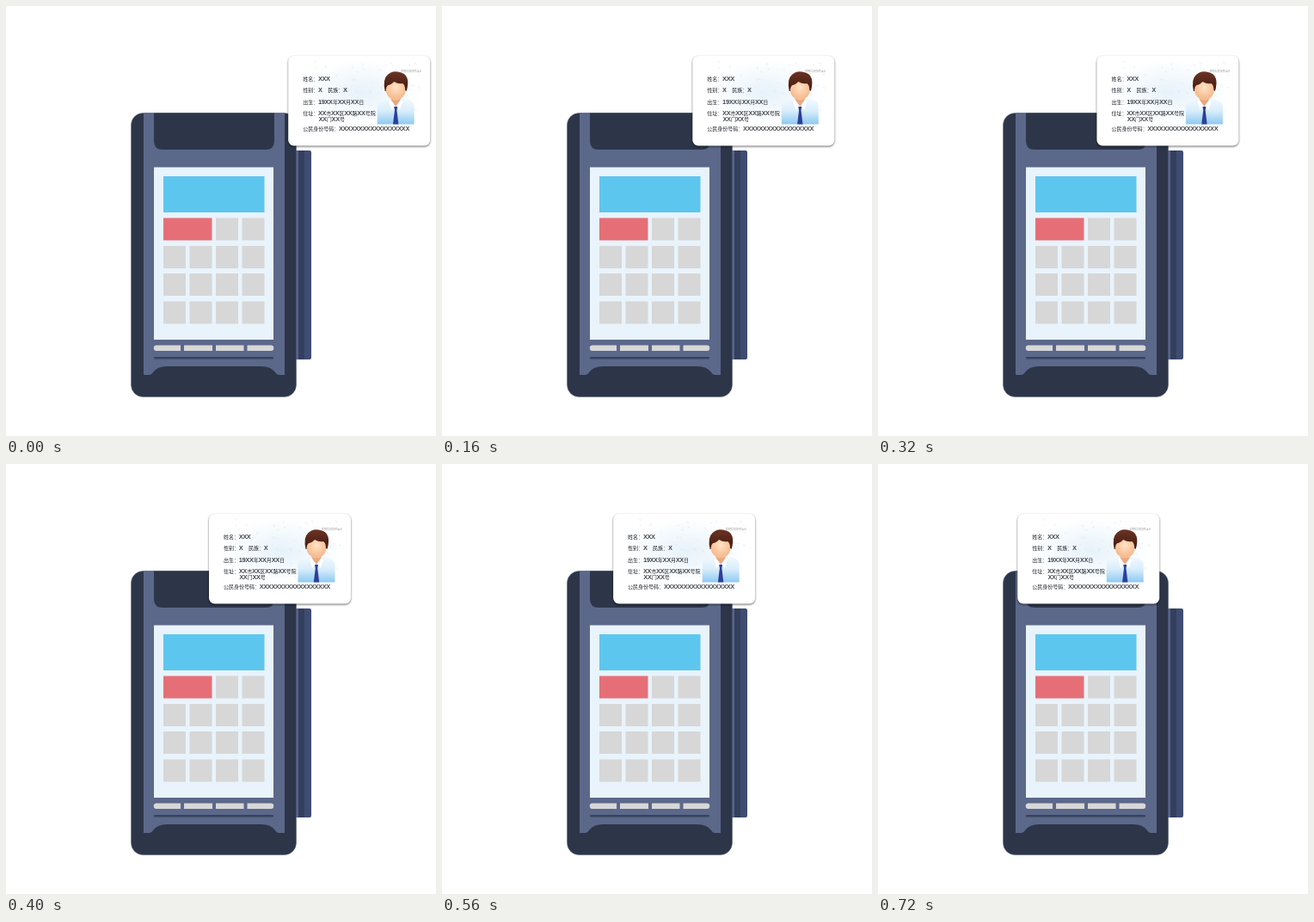
Recreate the animation shown at these times as an HTML page. Size 500 px wide and 500 px high, loop 1200 ms.

```html
<!DOCTYPE html>
<html lang="zh">
<head>
<meta charset="utf-8">
<style>
  html, body { margin: 0; width: 100%; height: 100%; overflow: hidden; background: #fff; }
  svg { display: block; width: 100%; height: 100%; }
  text { font: 500 6px "Noto Sans CJK SC", "Noto Sans CJK", sans-serif; fill: #1d1f26; }
  .latin { font: 6.84px "Liberation Sans", Arial, sans-serif; stroke: #1d1f26; stroke-width: .15; }
  .note { font-size: 3px; fill: #999; }
  #card { filter: drop-shadow(0 1px .8px rgba(0, 0, 0, .6)); }
</style>
</head>
<body>
<svg viewBox="0 0 500 500">
  <defs>
    <linearGradient id="shirt" x2="0" y2="1">
      <stop offset="0" stop-color="#f4faff"/>
      <stop offset=".5" stop-color="#d8edfb"/>
      <stop offset="1" stop-color="#8ec9f0"/>
    </linearGradient>
    <radialGradient id="skin" cy=".4">
      <stop offset="0" stop-color="#ffe3c6"/>
      <stop offset="1" stop-color="#f6bd92"/>
    </radialGradient>
    <linearGradient id="hair" x2="0" y2="1">
      <stop offset="0" stop-color="#6b3425"/>
      <stop offset="1" stop-color="#42190f"/>
    </linearGradient>
    <radialGradient id="tint">
      <stop offset="0" stop-color="#e6f2fa"/>
      <stop offset="1" stop-color="#fff"/>
    </radialGradient>
  </defs>

  <!-- card reader -->
  <rect x="332" y="168" width="23" height="243" rx="2" fill="#3f4c72"/>
  <path d="M337 168h3v243h-3z" fill="#56648a"/>
  <path d="M340 168h7v243h-7z" fill="#343f5d"/>
  <rect x="145.5" y="124.5" width="192" height="330" rx="14" fill="#2d3549" stroke="#59627a" stroke-width=".5"/>
  <path d="M160 124.5H324V429H160z" fill="#5c688a"/>
  <path d="M172 124.5H312V157q0 10-10 10H182q-10 0-10-10z" fill="#2d3549"/>
  <path d="M160 429h7q2 0 4-3q5-7 16-7H297q11 0 16 7q2 3 4 3h7v2H160z" fill="#2d3549"/>
  <path d="M172 187.5H311V388H172z" fill="#e9f3fb"/>
  <path d="M183 198H300.5V240H183z" fill="#5dc6ef"/>
  <path d="M183 246.5H239.5V272.5H183z" fill="#e66f77"/>
  <g id="keys" fill="#d7d7d8"></g>
  <path d="M203 394.5H175a3.2 3.2 0 0 0 0 6.5H203zM207 394.5H240V401H207zM244 394.5H276.5V401H244zM280.5 394.5H308a3.2 3.2 0 0 1 0 6.5H280.5z" fill="#d7d7d8"/>
  <rect x="172" y="408" width="139" height="2.5" rx="1" fill="#38425e"/>

  <!-- identity card, drawn from its own left edge -->
  <g id="card">
    <rect y="58" width="165" height="104.5" rx="6.5" fill="#fff"/>
    <ellipse cx="85" cy="101" rx="70" ry="38" fill="url(#tint)"/>
    <g id="specks" fill="none" stroke="#dcebf5" stroke-width=".7"></g>
    <g id="lines"></g>
    <text class="note" x="131" y="77">样例信息仅供演示</text>
    <path d="M103.5 137.5V118q0-7 7-8.500l8-2.500h13l8 2.500q7 1.500 7 8.500v19.500z" fill="url(#shirt)"/>
    <path d="M119.500 103h11v8l-5.500 7l-5.500-7z" fill="#eda77a"/>
    <path d="M119 108.500l6 8.500l-5 4.500l-4-11zM131 108.500l-6 8.500l5 4.500l4-11z" fill="#fff" stroke="#cfe3f2" stroke-width=".4"/>
    <path d="M123 117h4l-.8 4l2 16.500h-6.400l2-16.500z" fill="#2c3f9b"/>
    <ellipse cx="125" cy="97" rx="11.500" ry="12.500" fill="url(#skin)"/>
    <path d="M112.500 99q-3-14 3-19q5-5 12-3.500q9 1 11 8q1.500 6-1 14.500l-1.500-1q0-6-3-8q-5 1-10-2q-4 4-7 4q-2.500 2-2.500 7z" fill="url(#hair)"/>
  </g>
</svg>
<script>
const byId = id => document.getElementById(id);

let keys = "";
[246.5, 279, 311, 343.5].forEach((y, row) =>
  [183, 213.5, 244, 274.5].forEach((x, col) => {
    if (row || col > 1) keys += `M${x} ${y}h26v26h-26z`;
  }));
byId("keys").innerHTML = `<path d="${keys}"/>`;

let seed = 7;
const random = () => (seed = seed * 16807 % 2147483647) / 2147483647;
let specks = "";
for (let i = 0; i < 70; i++) {
  specks += `M${20 + random() * 132} ${65 + random() * 70}q1 -2 ${1 + random() * 2} ${random() * 2}`;
}
byId("specks").innerHTML = `<path d="${specks}"/>`;

const line = (x, y, words) => `<text x="${x}" y="${y}">${
  words.replace(/[0-9X]+/g, run => `<tspan class="latin">${run}</tspan>`)}</text>`;
byId("lines").innerHTML = [
  [17, 86.7, "姓名：XXX"],
  [17, 100.2, "性别：X"],
  [46, 100.2, "民族：X"],
  [17, 113.7, "出生：19XX年XX月XX日"],
  [17, 127, "住址：XX市XX区XX路XX号院"],
  [35.5, 134, "XX门XX号"],
  [17, 145, "公民身份号码：" + "X".repeat(18)]
].map(args => line(...args)).join("");

// The card slides left in nine equal steps, then rests until the loop ends.
const card = byId("card");
function draw(now) {
  const step = Math.min(9, Math.floor(now % 1200 / 80));
  card.setAttribute("transform", `translate(${328.2 - step * 18.44} 0)`);
  requestAnimationFrame(draw);
}
draw(performance.now());
</script>
</body>
</html>
```
